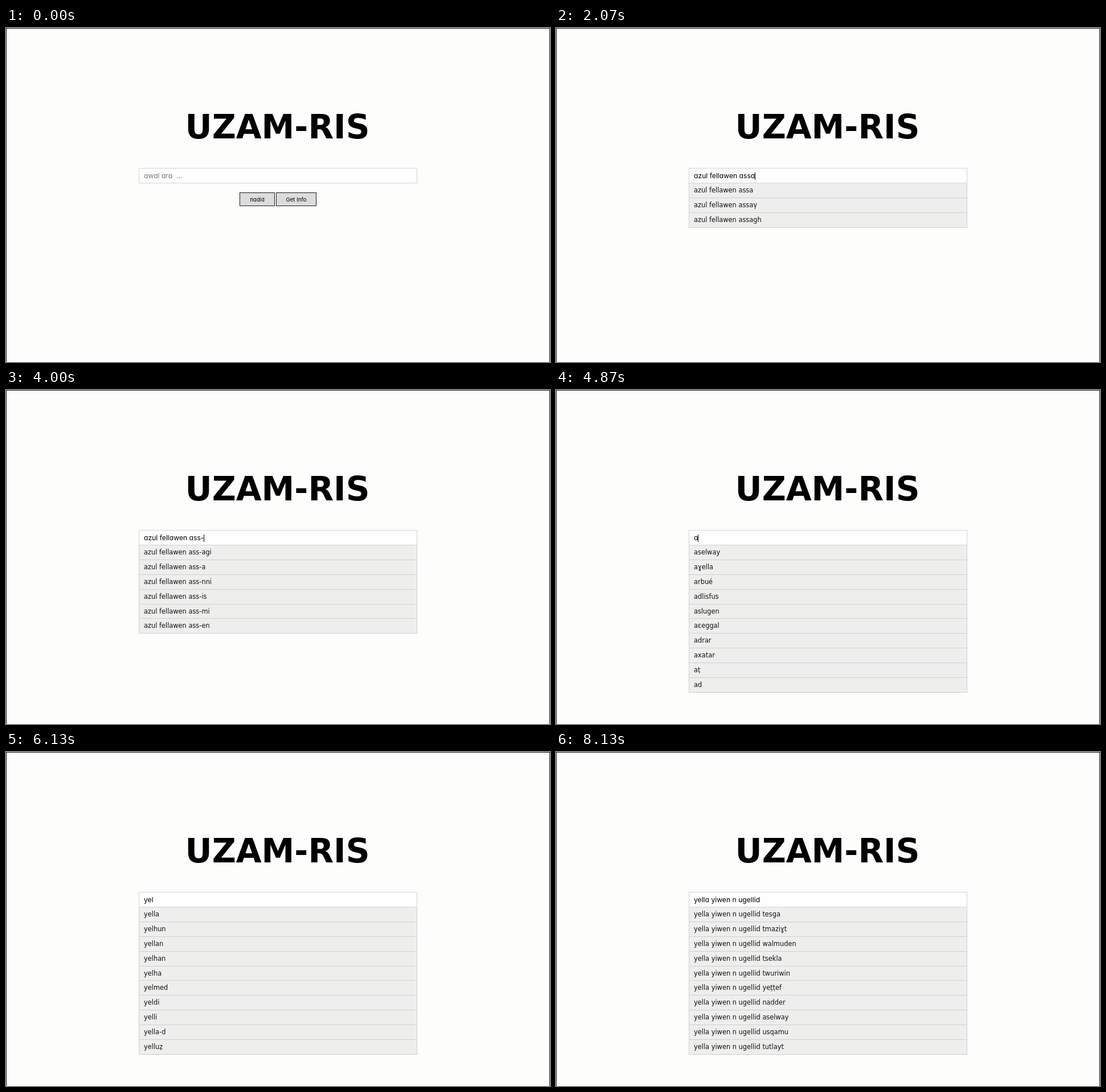
Write an HTML page that moves like this. It is 955 px wide and 587 px high and loops after 8.19 s.

```html
<!DOCTYPE html>
<html lang="kab">
<head>
<meta charset="utf-8">
<title>Word suggestions</title>
<style>
  html, body { margin: 0; width: 100%; height: 100%; overflow: hidden; }
  body { position: relative; background: #fdfdfc; color: #000; }
  * { box-sizing: border-box; }
  #edge { position: absolute; inset: 0; border: 1px solid #14141f; border-bottom: 0; }
  h1 {
    position: absolute; left: 0; top: 144px; width: 953px; margin: 0;
    font: bold 58px/60px "DejaVu Sans", sans-serif; text-align: center;
  }
  #field, button { font-family: Inter, sans-serif; font-feature-settings: "cv11"; }
  #field {
    position: absolute; left: 233px; top: 246px; width: 489px; height: 27px;
    padding-left: 8px; border: 1px solid #d4d4d4; background: #fefefe;
    font-size: 12.15px; line-height: 25px; white-space: pre;
  }
  #field.empty { color: #777; }
  #caret {
    display: inline-block; width: 1px; height: 13px; margin-right: -1px;
    background: #000; vertical-align: -3px;
  }
  button {
    position: absolute; top: 289px; height: 24px; padding: 0;
    border: 1px solid #1a1a1a; border-radius: 0; background: #dcdcdc; color: #000; font-size: 9.6px;
  }
  #list {
    position: absolute; left: 233px; top: 273px; width: 489px;
    font: 11.4px/24.9px "DejaVu Sans", sans-serif; color: #111;
  }
  #list div {
    height: 25.9px; padding-left: 8px; white-space: pre; background: #eeeeed;
    border: solid #d0d0d2; border-width: 0 1px 1px;
  }
</style>
</head>
<body>
<div id="edge"></div>
<h1>UZAM-RIS</h1>
<div id="field"><span id="before"></span><span id="caret"></span><span id="hint">awal ara  ...</span></div>
<button style="left:410px;width:62px">nadid</button>
<button style="left:474px;width:71px">Get Info</button>
<div id="list"></div>
<script>
const LOOP = 8190;

// Words offered after each finished context
const pools = {
  '': 'aselway aɣella arbué adlisfus aslugen aεeggal adrar axatar aṭ ad ' +
      'azul azal azekka azrem azger azemmur azetta azniq azref azru ' +
      'yella yelhun yellan yelhan yelha yelmed yeldi yelli yella-d yelluẓ',
  'azul ': 'fellawen fellak fell-am fellasen felli i a ay d ɣef',
  'azul fellawen ': 'assa assaγ assagh ass-agi ass-a ass-nni ass-is ass-mi ass-en assen',
  'azul fellawen assa ': 'ad d i yella deg nezmer tella ara n ɣef',
  'yella ': 'yiwen yiwet yiw yiwen yiwwas yiwsir yiwwi-d yiwenacku yiwi-d yiwen-is',
  'yella yiwen ': 'n deg seg wergaz ur ad i d umdan ɣef',
  'yella yiwen n ': 'ugellid umdan wergaz wass uqcic umeddakel udrar unelmad uxxam wemkan',
  'yella yiwen n ugellid ':
      'tesga tmaziɣt walmuden tsekla twuriwin yeṭṭef nadder aselway usqamu tutlayt'
};

function suggest(text) {
  if (!text) return [];
  const cut = text.lastIndexOf(' ') + 1;
  const context = text.slice(0, cut);
  // Near matches are kept after "yella"
  const stem = text.slice(cut, context === 'yella ' ? cut + 3 : undefined);
  return (pools[context] || '').split(' ')
    .filter(word => word.startsWith(stem))
    .slice(0, 10)
    .map(word => context + word);
}

const edits = [{ at: 0, text: '' }];
const current = () => edits[edits.length - 1].text;

function type(start, gap, text) {
  [...text].forEach((c, i) => edits.push({ at: start + i * gap, text: current() + c }));
}
function erase(start, gap, count) {
  for (let i = 0; i < count; i++) edits.push({ at: start + i * gap, text: current().slice(0, -1) });
}

type(180, 105, 'azul fellawen assa');
type(2420, 0, ' ');
erase(3300, 200, 2);
type(3780, 0, '-');
erase(4240, 38, 17);
erase(4932, 0, 1);
type(5600, 170, 'yel');
type(6250, 98, 'la yiwe');
type(6950, 98, 'n n ugellid ');

const el = id => document.getElementById(id);
let shown = null;

function show(text) {
  shown = text;
  el('before').textContent = text;
  el('hint').hidden = text !== '';
  el('field').className = text ? '' : 'empty';
  el('list').replaceChildren(...suggest(text).map(item => {
    const row = document.createElement('div');
    row.textContent = item;
    return row;
  }));
}

function draw(now) {
  const t = now % LOOP;
  const text = edits.filter(e => e.at <= t).pop().text;
  if (text !== shown) show(text);
  const lit = t > 150 && (t + 400) % 1000 < 500;
  el('caret').style.visibility = lit ? 'visible' : 'hidden';
}

const start = performance.now();
function tick() {
  draw(performance.now() - start);
  requestAnimationFrame(tick);
}
tick();
</script>
</body>
</html>
```
